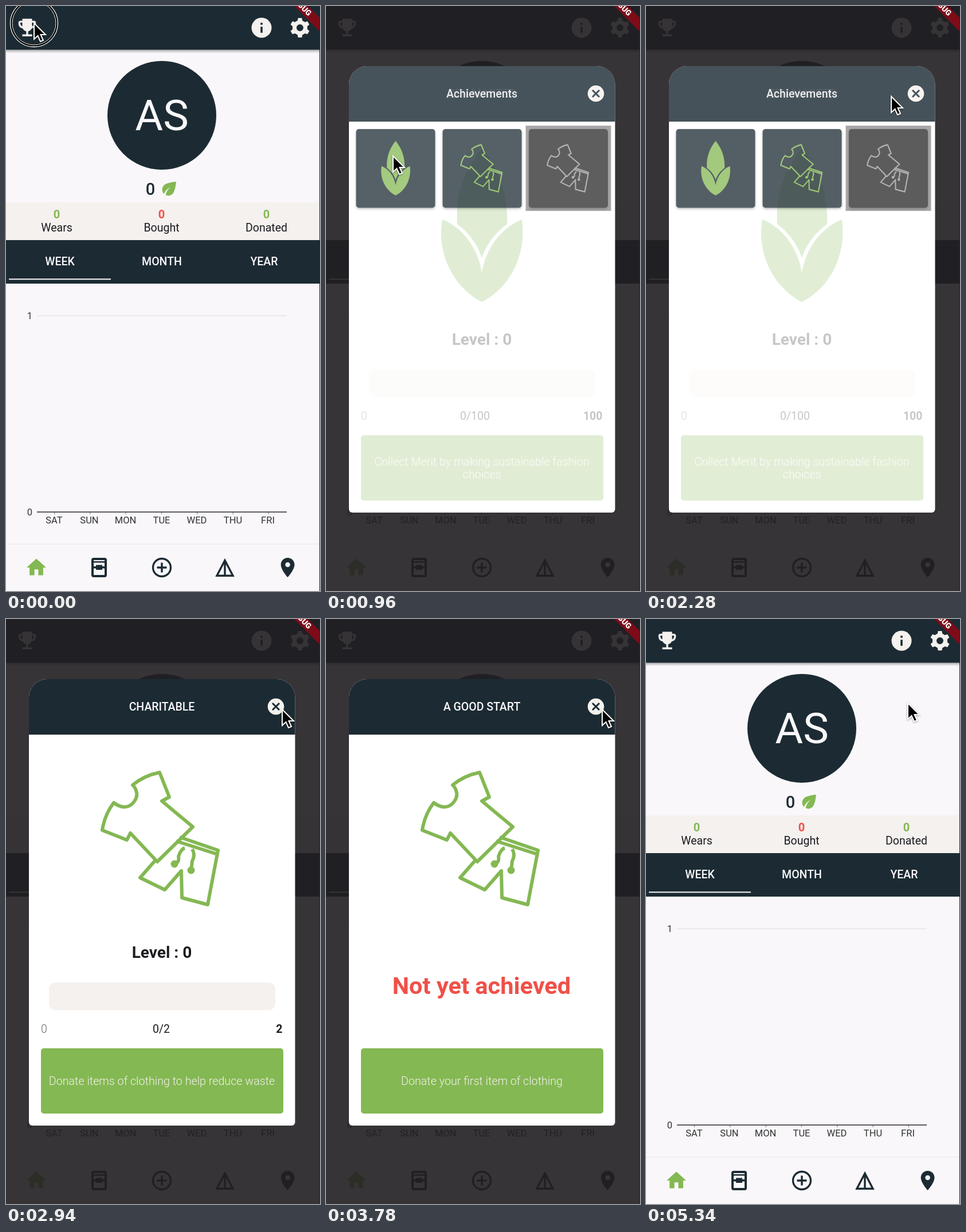
An HTML page that plays this animation: 548 px wide and 1022 px high, repeating every 5400 ms.

```html
<!DOCTYPE html>
<html lang="en">
<head>
<meta charset="utf-8">
<title>Achievements</title>
<style>
  html, body { margin: 0; width: 100%; height: 100%; overflow: hidden; background: #f9f7fa; }
  svg { display: block; width: 100%; height: 100%; }
  text { font-family: Roboto, sans-serif; text-anchor: middle; }

  .navy { fill: #1c2b33; }
  .green { fill: #84b853; }
  .pale { fill: #f4f1ee; }
  .ink { fill: #1c1b20; }
  .line { fill: none; stroke: #1c2b33; }
  .label { font-size: 19.5px; }
  .tab, .title { font-size: 19.5px; font-weight: 500; fill: #f9f7fa; }
  .stat { font-size: 20px; font-weight: 700; }
  .axis { font-size: 16.5px; fill: #333; }
  .level { font-size: 28px; font-weight: 700; }
  .hint { font-size: 19.7px; font-weight: 300; fill: #f4f1ee; }
  .start { text-anchor: start; font-weight: 300; }
  .end { text-anchor: end; font-weight: 700; }
  .tile { filter: drop-shadow(0 2px 2px rgba(0, 0, 0, .35)); }

  #modal, .page, #halo, #cursor, #ring { animation: 5400ms linear infinite; }
  #modal { animation-name: modal; }
  #zen { animation-name: zen; }
  #charitable { animation-name: charitable; }
  #good-start { animation-name: good-start; }
  #list { animation-name: list; }
  #halo { animation-name: halo; animation-timing-function: step-end; }
  #cursor { animation-name: cursor; animation-timing-function: ease-in-out; }
  #ring { animation-name: ring; animation-timing-function: step-end; }

  @keyframes modal {
    0%, 1.67%, 87.8%, 100% { opacity: 0; }
    5%, 84.4% { opacity: 1; }
  }
  @keyframes list {
    0%, 16.67%, 43.33%, 49.26%, 61.11%, 64.81%, 77.04%, 100% { opacity: 1; }
    21.11%, 38.89%, 53.7%, 56.67%, 69.26%, 72.59% { opacity: 0; }
  }
  @keyframes zen {
    0%, 16.67%, 43.33%, 100% { opacity: 0; }
    21.11%, 38.89% { opacity: 1; }
  }
  @keyframes charitable {
    0%, 49.26%, 61.11%, 100% { opacity: 0; }
    53.7%, 56.67% { opacity: 1; }
  }
  @keyframes good-start {
    0%, 64.81%, 77.04%, 100% { opacity: 0; }
    69.26%, 72.59% { opacity: 1; }
  }
  /* grey backing that shows only while the list is fading */
  @keyframes halo {
    0%, 43.33%, 61.11%, 77.04%, 100% { opacity: 0; }
    16.67%, 49.26%, 64.81% { opacity: 1; }
  }
  @keyframes cursor {
    0%, 2.2% { transform: translate(49px, 30px); }
    11.1%, 18.5% { transform: translate(117px, 262px); }
    31.5%, 33.4% { transform: translate(522px, 164px); }
    37%, 39.6% { transform: translate(482px, 158px); }
    42.2% { transform: translate(428px, 158px); }
    46.3%, 50% { transform: translate(286px, 283px); }
    53.7%, 57% { transform: translate(482px, 158px); }
    62.2%, 65.6% { transform: translate(425px, 285px); }
    69.26%, 87% { transform: translate(482px, 158px); }
    96.3%, 100% { transform: translate(457px, 147px); }
  }
  @keyframes ring {
    0%, 13.3%, 37.4%, 47.2%, 54.6%, 63%, 70.4%, 82.4% { opacity: 1; }
    2.2%, 16.3%, 39.6%, 49.8%, 57%, 65.6%, 73%, 85%, 100% { opacity: 0; }
  }
</style>
</head>
<body>
<svg viewBox="0 0 548 1022" preserveAspectRatio="none">
  <defs>
    <linearGradient id="shade" x2="0" y2="1">
      <stop stop-color="#000" stop-opacity=".3"/>
      <stop offset="1" stop-color="#000" stop-opacity="0"/>
    </linearGradient>
    <clipPath id="dialog-shape">
      <path d="M40 137a32 32 0 0 1 32-32H472.500a32 32 0 0 1 32 32V879a6 6 0 0 1-6 6H46a6 6 0 0 1-6-6Z"/>
    </clipPath>
    <path id="tooth" d="M-4.500-11 -3.300-17H3.300L4.500-11Z"/>
    <g id="head">
      <path class="navy" d="M40 105H505V202H40Z"/>
      <circle class="pale" cx="471" cy="153" r="14.300"/>
      <path class="line" stroke-width="3" d="m465 147 12 12m0-12-12 12"/>
    </g>
    <g id="lotus" class="green">
      <path d="M272 249C242 285 226 330 229 381C248 395 264 415 272 440C280 415 297 395 316 381C318 330 302 285 272 249Z"/>
      <path d="M203 373C235 385 265 420 272 466C279 420 310 385 342 373C350 430 325 490 272 517C220 490 193 430 203 373Z"/>
    </g>
    <g id="clothes" fill="none" stroke="currentColor" stroke-width="6" stroke-linejoin="round">
      <path d="M268 268 285 311 272 318 326 363 264 424 217 374 211 386 168 369Q172 342 188 321C200 330 215 333 225 317C231 308 228 297 221 290Q240 274 268 268Z"/>
      <path d="M303 381 370 404 352 499 307 487 306 440 277 473 234 452 262 420M297 388 366 410"/>
      <path d="M294 427Q303 426 301 415 305 402 312 400M325 402Q331 412 325 423L323 438"/>
      <g fill="currentColor" stroke="none">
        <circle cx="294" cy="428" r="6.500"/>
        <circle cx="323" cy="439" r="6.500"/>
      </g>
    </g>
    <rect id="tile" y="215" width="138" height="137.500" rx="5"/>
    <rect id="hint-box" class="green" x="61" y="750" width="423" height="114" rx="5"/>
    <g id="progress">
      <text class="level ink" x="272" y="592">Level : 0</text>
      <rect class="pale" x="75" y="635" width="395" height="48.500" rx="12"/>
      <text class="label start" x="61" y="723" fill="#666">0</text>
    </g>
  </defs>

  <g id="home">
    <path fill="#f9f7fa" d="M0 0H548V1022H0Z"/>
    <path class="navy" d="M0 0H548V76.500H0Z"/>
    <rect y="76.500" width="548" height="6" fill="url(#shade)"/>

    <g class="pale">
      <path transform="translate(16.600 17.200) scale(1.700)" fill-rule="evenodd" d="M19 5h-2V3H7v2H5c-1.100 0-2 .9-2 2v1c0 2.550 1.920 4.630 4.390 4.940.63 1.500 1.980 2.630 3.610 2.960V19H7v2h10v-2h-4v-3.100c1.630-.33 2.980-1.460 3.610-2.960C19.080 12.630 21 10.550 21 8V7c0-1.100-.9-2-2-2zM5 8V7h2v3.820C5.840 10.400 5 9.300 5 8zm14 0c0 1.300-.84 2.400-2 2.820V7h2v1z"/>
      <circle cx="446" cy="38" r="17.500"/>
      <path class="navy" d="M444.200 29.200h3.600v3.600h-3.600zm0 7h3.600v10.500h-3.600z"/>
      <g transform="translate(513 38)">
        <circle r="9.500" fill="none" stroke="#f4f1ee" stroke-width="7"/>
        <use href="#tooth"/>
        <use href="#tooth" transform="rotate(60)"/>
        <use href="#tooth" transform="rotate(120)"/>
        <use href="#tooth" transform="rotate(180)"/>
        <use href="#tooth" transform="rotate(240)"/>
        <use href="#tooth" transform="rotate(300)"/>
      </g>
    </g>

    <circle class="navy" cx="272" cy="191" r="95"/>
    <text x="272" y="217" font-size="75" fill="#f9f7fa">AS</text>
    <text class="navy" x="252" y="330" font-size="29" font-weight="500">0</text>
    <path class="green" transform="translate(266.500 301) scale(1.520)" d="M6.050 8.050c-2.730 2.730-2.730 7.150-.02 9.880 1.470-3.400 4.090-6.240 7.360-7.930-2.770 2.340-4.710 5.610-5.390 9.320 2.600 1.230 5.800.78 7.950-1.370C19.430 14.470 20 4 20 4S9.530 4.570 6.050 8.050z"/>

    <path class="pale" d="M0 343H548V409H0Z"/>
    <text class="stat green" x="88.500" y="371">0</text>
    <text class="stat" x="271.500" y="371" fill="#f05048">0</text>
    <text class="stat green" x="454.500" y="371">0</text>
    <text class="label ink" x="88.500" y="393.500">Wears</text>
    <text class="label ink" x="271.500" y="393.500">Bought</text>
    <text class="label ink" x="454.500" y="393.500">Donated</text>

    <path class="navy" d="M0 409H548V485H0Z"/>
    <text class="tab" x="94" y="453">WEEK</text>
    <text class="tab" x="272" y="453">MONTH</text>
    <text class="tab" x="450.500" y="453">YEAR</text>
    <path fill="#f9f7fa" d="M5 476.200H183V478.200H5Z"/>

    <path stroke="#dddbde" d="M54 541H490"/>
    <path stroke="#777" d="M84.500 884v4m62.300-4v4m62.300-4v4m62.300-4v4m62.300-4v4m62.300-4v4m62.300-4v4"/>
    <path stroke="#2a2730" stroke-width="1.700" d="M54 884H490"/>
    <g class="axis">
      <text x="41.500" y="547">1</text>
      <text x="41.500" y="890">0</text>
      <text x="84" y="903.500">SAT</text>
      <text x="145.500" y="903.500">SUN</text>
      <text x="208.500" y="903.500">MON</text>
      <text x="271.500" y="903.500">TUE</text>
      <text x="333" y="903.500">WED</text>
      <text x="396" y="903.500">THU</text>
      <text x="457" y="903.500">FRI</text>
    </g>

    <path stroke="#e6e4e7" d="M0 940H548"/>
    <path class="green" transform="translate(32.600 960.500) scale(1.700)" d="M10 20v-6h4v6h5v-8h3L12 3 2 12h3v8z"/>
    <rect class="navy" x="149" y="964" width="27" height="34" rx="4"/>
    <path fill="#f9f7fa" d="M153 968h19v2h-19zm0 4.500h19v6.500h-4v-2.500h-11v2.500h-4zm0 10h4v2.500h11v-2.500h4v11.500h-19z"/>
    <circle class="line" cx="272" cy="981" r="15.500" stroke-width="3.300"/>
    <path class="line" stroke-width="3.400" d="M263.500 981h17m-8.500-8.500v17"/>
    <path class="line" stroke-width="3.400" d="M382 968.500 368 995.300H396ZM382 970V995"/>
    <path class="navy" transform="translate(471.200 960.600) scale(1.700)" fill-rule="evenodd" d="M12 2C8.130 2 5 5.130 5 9c0 5.250 7 13 7 13s7-7.750 7-13c0-3.870-3.130-7-7-7zm0 9.500a2.500 2.500 0 0 1 0-5 2.500 2.500 0 0 1 0 5z"/>
  </g>

  <g id="modal">
    <path fill="#221f22" fill-opacity=".9" d="M0 0H548V1022H0Z"/>
    <g clip-path="url(#dialog-shape)">
      <path fill="#fff" d="M40 105H505V885H40Z"/>

      <g id="zen" class="page">
        <use href="#head"/>
        <text class="title" x="272" y="160">ZEN MASTER</text>
        <use href="#lotus"/>
        <use href="#progress"/>
        <text class="label ink" x="260" y="723">0/100</text>
        <text class="label ink end" x="482.500" y="723">100</text>
        <use href="#hint-box"/>
        <text class="hint" x="272" y="803">Collect Merit by making sustainable fashion</text>
        <text class="hint" x="272" y="825">choices</text>
      </g>

      <g id="charitable" class="page">
        <use href="#head"/>
        <text class="title" x="272" y="160">CHARITABLE</text>
        <use href="#clothes" color="#84b853"/>
        <use href="#progress"/>
        <text class="label ink" x="271" y="723">0/2</text>
        <text class="label ink end" x="482.500" y="723">2</text>
        <use href="#hint-box"/>
        <text class="hint" x="272" y="814">Donate items of clothing to help reduce waste</text>
      </g>

      <g id="good-start" class="page">
        <use href="#head"/>
        <text class="title" x="272" y="160">A GOOD START</text>
        <use href="#clothes" color="#84b853"/>
        <text x="271.500" y="655" font-size="41.500" font-weight="700" fill="#f05048">Not yet achieved</text>
        <use href="#hint-box"/>
        <text class="hint" x="272" y="814">Donate your first item of clothing</text>
      </g>

      <g id="list" class="page">
        <use href="#head"/>
        <text class="title" x="272" y="160">Achievements</text>
        <rect id="halo" x="348.500" y="209" width="149" height="149" fill="#8b8b8b"/>
        <use href="#tile" class="tile navy" x="52.500"/>
        <use href="#tile" class="tile navy" x="203.500"/>
        <use href="#tile" class="tile" x="354" fill="#272727"/>
        <use href="#lotus" transform="translate(24.700 147) scale(.356)"/>
        <use href="#clothes" transform="translate(175.500 147) scale(.356)" color="#84b853"/>
        <use href="#clothes" transform="translate(326.300 147) scale(.356)" color="#9a9a9a"/>
      </g>
    </g>
  </g>

  <path fill="#7c0d18" d="M503 0H527L548 21V45Z"/>
  <text transform="translate(527.500 18) rotate(45)" font-size="13.500" font-weight="900" fill="#fff" style="text-anchor: end">DEBUG</text>
  <path fill="#26242a" d="M547 0h1V1022h-1z"/>

  <g id="cursor">
    <g id="ring" fill="none">
      <circle r="39.700" stroke="#000" stroke-width="5"/>
      <circle r="41.500" stroke="#fff" stroke-width="1.300"/>
      <circle r="38" stroke="#fff"/>
    </g>
    <path d="M0 0V28L6.500 22 11 32 16 30 11.500 20H20Z" stroke="#fff" stroke-width="2" style="filter: drop-shadow(0 1px 1.500px rgba(0, 0, 0, .4))"/>
  </g>
</svg>
</body>
</html>
```
